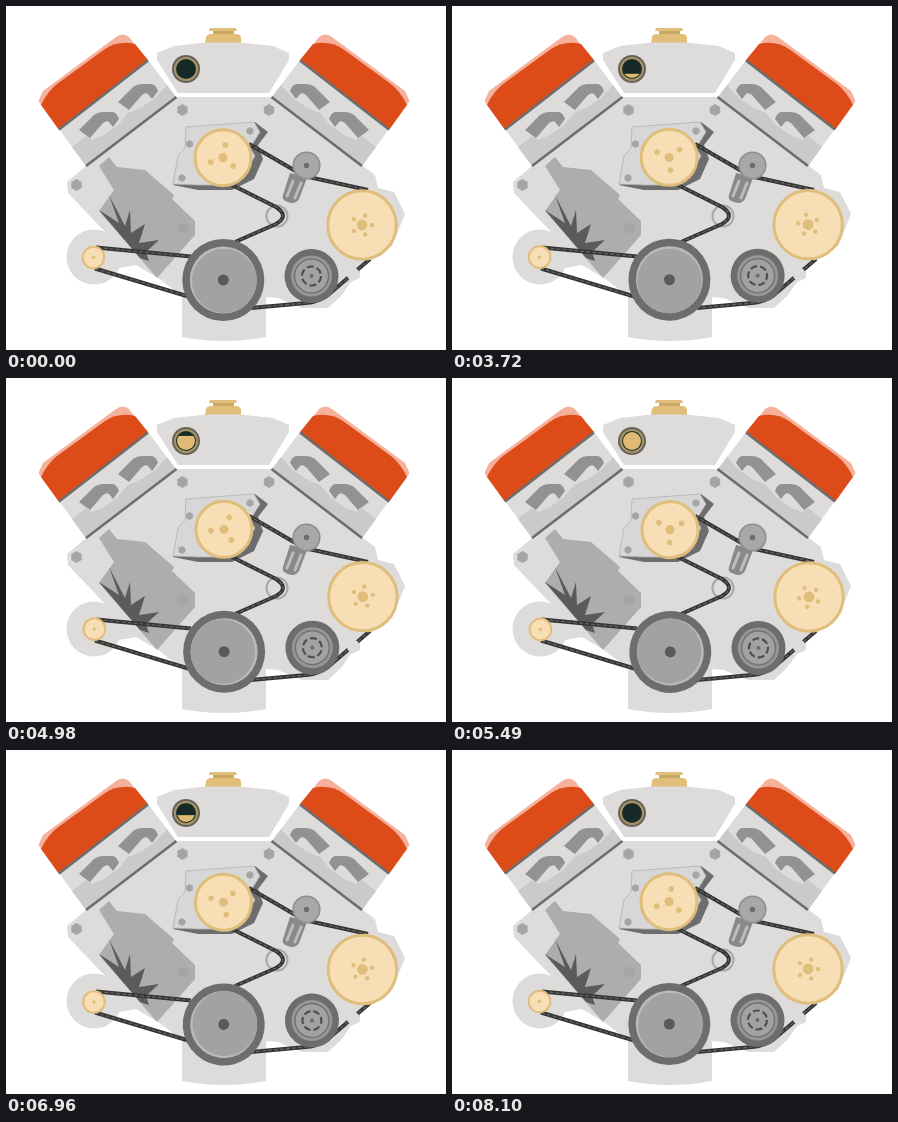
Recreate the animation shown at these times as an HTML page. Size 440 by 344 pixels, loop 9.03 s.

```html
<!DOCTYPE html>
<html lang="en">
<head>
<meta charset="utf-8">
<title>Engine</title>
<style>
html, body { margin: 0; width: 100%; height: 100%; overflow: hidden; background: #fff; }
svg { display: block; width: 440px; height: 344px; }
.body { fill: #dddcdb; }
.mid { fill: #adadad; }
.dark { fill: #6e6d6d; }
.gold { fill: #dfbd7b; }
.cream { fill: #f8deb5; stroke: #dfbd7b; stroke-width: 3; }
.belt { fill: none; stroke: #343434; stroke-width: 4; }
.teeth { fill: none; stroke: #66655f; stroke-width: 1.2; stroke-dasharray: 4 2; }
</style>
</head>
<body>
<svg viewBox="0 0 440 344">
  <defs>
    <clipPath id="glass"><circle cx="180" cy="63" r="9"/></clipPath>
    <g id="head">
      <path fill="#f6b19c" d="M35 99L32.500 95L37 85L110 31Q117 26 123 31L130 40L60 105Z"/>
      <path fill="#dd4b19" d="M35 99Q41 86 51 78L99 43Q113 34 129 38L142 54L53 124Z"/>
      <path class="body" d="M53 123L142 54L170 91L80 160Z"/>
      <path fill="#cbcaca" d="M66 141L80 130L86 134L98 129L112 119L122 107L136 101L149 92L161 79L170 91L80 160Z"/>
      <g id="port">
        <path fill="#939291" d="M73 124L88 109Q92 106 97 106H107Q111 107 113 113L107 121L103 116Q101 114 97 117L84 132Z"/>
      </g>
      <use href="#port" transform="translate(39 -28)"/>
      <path fill="none" stroke="#6e6d6d" stroke-width="2.6" d="M53 123.500L142 54.500M80 160L170.500 91"/>
    </g>
  </defs>

  <!-- block -->
  <circle class="body" cx="88" cy="251" r="27.500"/>
  <path class="body" d="M171 91H265L357 160L369 169L372 182L388 186L399 208L386 240L354 262V272L345 276L335 290L322 302H296L272 292L260 291V331Q218 339 176 331V290L152 272L130 259L113 262L98 277L72 230L104 231L62 187L61 176L80 160Z"/>
  <use href="#head"/>
  <use href="#head" transform="translate(436) scale(-1 1)"/>

  <!-- filler cap and cover -->
  <path class="gold" d="M204 22H230L231 25H203Z"/>
  <path fill="#c9a766" d="M207 25H228V29H207Z"/>
  <path fill="#e1bf7b" d="M199 37L200 31Q201 28 205 28H230Q234 28 235 31V37Z"/>
  <path class="body" d="M168 40L200 36.500H235L267 40L283 47V54L263 87H172L151 54V47Z"/>
  <circle cx="180" cy="63" r="14" fill="#68635a"/>
  <circle cx="180" cy="63" r="11" fill="#182a28" stroke="#a99468" stroke-width="2"/>
  <rect id="oil" x="168" y="73" width="24" height="24" fill="#deba74" clip-path="url(#glass)"/>

  <!-- left bracket -->
  <path class="mid" d="M93 160L103 151L111 161L139 164L168 189L166 193L189 215V229L151 272L93 205L108 184Z"/>
  <path fill="#5c5b5b" d="M93 204L113 217L103 189L119 220L124 204L125 227L139 218L133 237L153 234L140 246L143 255L134 252Z"/>

  <!-- pump plate -->
  <path class="dark" d="M249 116L262 126L252 139L257 153L248 173L226 184H192L167 179Z"/>
  <path fill="#d8d7d7" stroke="#b3b2b2" stroke-width=".8" d="M180 121L248 116L254 126L244 142L249 150L240 165L224 179H192L167 178L172 150L179 142Z"/>
  <g id="bolts" fill="#a6a5a5"></g>

  <circle cx="271" cy="210" r="10.500" fill="#dddcda" stroke="#a9a8a8" stroke-width="2"/>
  <path fill="#8a8989" d="M284 167Q291 168 301 172L293 193Q289 199 282 196Q275 194 277 189Z"/>
  <path fill="none" stroke="#bdbbbb" stroke-width="3" stroke-linecap="round" d="M287 175L281 190M295 177L289 192"/>

  <g id="belts"></g>

  <circle cx="300.500" cy="159.500" r="13.300" fill="#a9a8a8" stroke="#8f8e8e" stroke-width="1.500"/>
  <circle cx="300.500" cy="159.500" r="2.700" fill="#6e6d6d"/>
  <circle class="body" cx="347" cy="268" r="6.500"/>

  <g class="wheel" data-at="217 151.700">
    <circle class="cream" r="28"/><circle class="gold" r="4.600"/>
    <g class="gold" data-dots="3 13 2.800 40"></g>
  </g>
  <g class="wheel" data-at="356 219">
    <circle class="cream" r="34.200"/><circle class="gold" r="5.400"/>
    <g class="gold" data-dots="5 10 2.200 0"></g>
  </g>
  <g class="wheel" data-at="87.500 251.500">
    <circle class="cream" r="10.800" style="stroke-width:2"/><circle class="gold" r="1.700"/>
  </g>
  <g class="wheel" data-at="217.300 274">
    <circle class="dark" r="41"/><circle r="33.500" fill="#bbb9b9"/>
    <circle cx="1" cy="1" r="32.300" fill="#a3a1a1"/><circle r="5.500" fill="#5b5a5a"/>
  </g>
  <g class="wheel" data-at="305.500 270">
    <circle class="dark" r="27"/><circle r="20.500" fill="#989696"/>
    <circle r="17" fill="#a3a1a1" stroke="#747373" stroke-width="1.500"/>
    <circle r="9.500" fill="none" stroke="#4f4e4e" stroke-width="2.200" stroke-dasharray="6.950 3"/>
    <circle r="2" fill="#6e6d6d"/>
  </g>
</svg>
<script>
const START = 3120, SPIN = 4980, LOOP = 9030;
const $ = id => document.getElementById(id);
const all = q => [...document.querySelectorAll(q)];
const rad = Math.PI / 180;

const hex = ([x, y, r]) => {
  const pts = [30, 90, 150, 210, 270, 330].map(a =>
    `${x + r * Math.cos(a * rad)},${y + r * Math.sin(a * rad)}`);
  return `<polygon points="${pts.join(' ')}"/>`;
};
$('bolts').innerHTML = [
  [176.5, 104, 6], [263, 104, 6], [70.5, 179, 6], [177, 222, 6],
  [183.5, 138, 4], [244, 125, 4], [176, 172, 4]
].map(hex).join('');

$('belts').innerHTML = [
  'M185 250.500L90 241.500',
  'M89 262.500L184 291',
  'M229 236L270 218Q284 210 270 201L226 179',
  'M243 138L293 167Q298 171 305 171.500L362 184',
  'M364 253L322 289Q312 296 300 297L245 302'
].map(d => `<path class="belt" d="${d}"/><path class="teeth" d="${d}"/>`).join('');

for (const g of all('[data-dots]')) {
  const [n, orbit, r, turn] = g.dataset.dots.split(' ').map(Number);
  for (let i = 0; i < n; i++) {
    const a = (turn + i * 360 / n) * rad;
    g.innerHTML += `<circle cx="${orbit * Math.cos(a)}" cy="${orbit * Math.sin(a)}" r="${r}"/>`;
  }
}

const wheels = all('.wheel'), teeth = all('.teeth');

function draw(now) {
  const turn = Math.min(1, Math.max(0, (now % LOOP - START) / SPIN));
  // pulleys run slightly off their axes
  for (const w of wheels)
    w.setAttribute('transform', `translate(${w.dataset.at}) rotate(${turn * 360} .5 0)`);
  for (const t of teeth) t.style.strokeDashoffset = -turn * 240;
  // oil fills, then drains a little faster
  const level = turn < .5 ? turn * 2 : Math.max(0, 1 - (turn - .5) * 2.3);
  $('oil').setAttribute('y', 72.5 - 19.5 * level);
}

const t0 = performance.now();
(function frame() {
  draw(performance.now() - t0);
  requestAnimationFrame(frame);
})();
</script>
</body>
</html>
```
